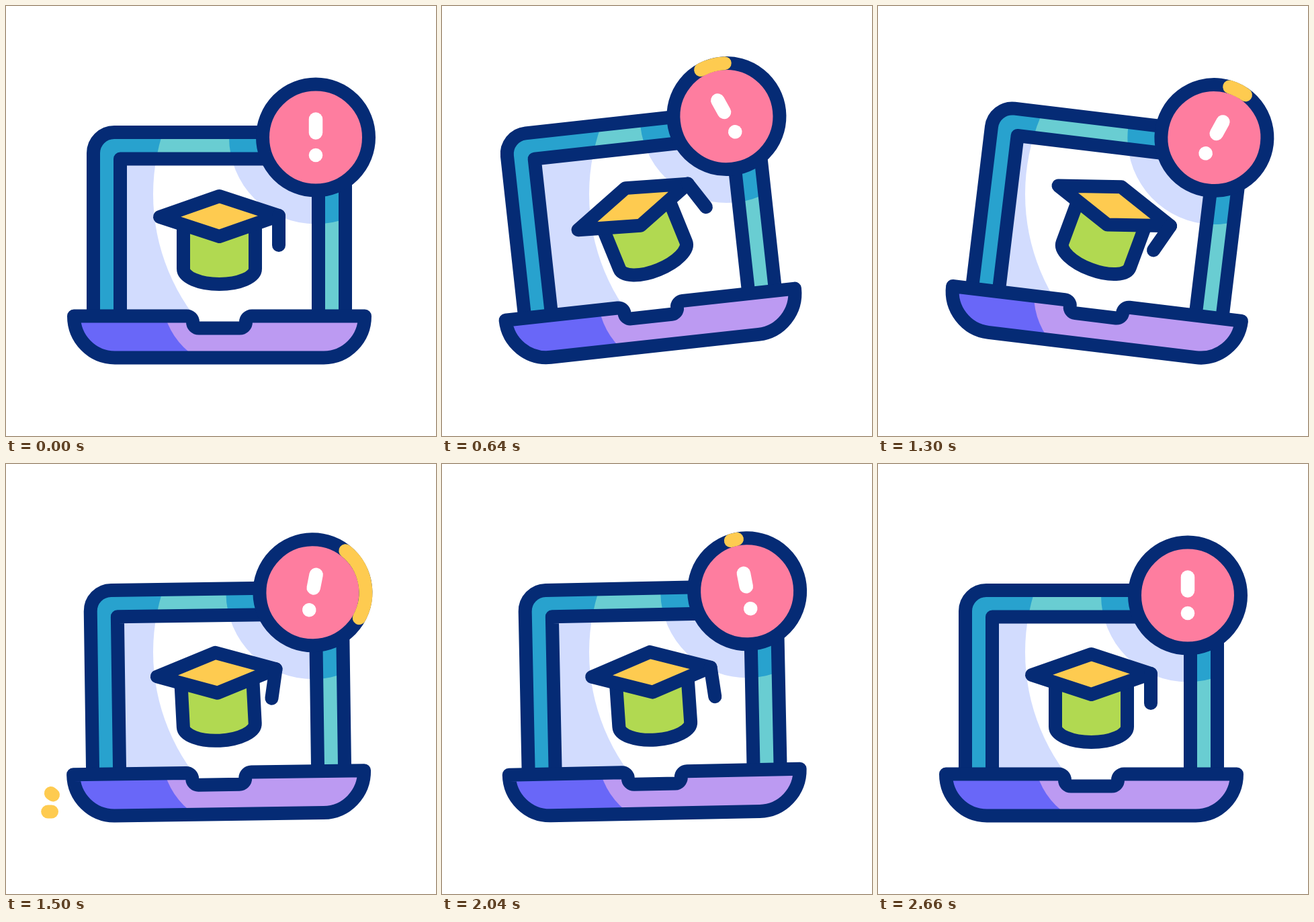
These frames come from a looping animation (640 px wide and 640 px high, 2820 ms). An HTML page with a canvas:

```html
<!DOCTYPE html>
<html lang="en">
<head>
<meta charset="utf-8">
<title>Rocking laptop</title>
<style>
  html, body { margin: 0; width: 100%; height: 100%; overflow: hidden; background: #fff; }
  canvas { display: block; width: 640px; height: 640px; }
</style>
</head>
<body>
<canvas id="stage"></canvas>
<script>
const LOOP = 2820;
const NAVY = '#052b75', TEAL = '#28a2ce', AQUA = '#69cdd2', HAZE = '#d2dcfe', WHITE = '#fff';
const INDIGO = '#6967f8', LILAC = '#bc9af2', PINK = '#fe7d9f', YELLOW = '#fecb50', GREEN = '#b1d951';

const canvas = document.getElementById('stage');
const ctx = canvas.getContext('2d');
const ratio = window.devicePixelRatio || 1;
canvas.width = canvas.height = 640 * ratio;

// Each swing: start, peak, end (ms), degrees at the peak
const SWINGS = {
  laptop: [[0, 340, 833, -8.1], [833, 1140, 1450, 8], [1450, 1818, 2080, -3.1], [2080, 2200, 2580, 2.05]],
  hat: [[0, 340, 833, -20.6], [833, 1140, 1450, 15.7], [1450, 1818, 2072, -8.5], [2072, 2200, 2600, 4.5]],
  mark: [[0, 450, 840, -25.8], [840, 1090, 1610, 23.5], [1610, 1930, 2204, -10.6], [2204, 2400, 2660, 5]],
  tassel: [[0, 600, 1010, -16], [1010, 1270, 1640, 14.5], [1640, 1860, 2120, -7.2], [2120, 2320, 2660, 4]]
};

const BADGE = { x: 461, y: 195.5, r: 79 };
const frame = new Path2D('M130 475V219A31 31 0 0 1 161 188H474A31 31 0 0 1 505 219V475');
const screen = new Path2D('M170 475V227.5H465V475');
const base = new Path2D('M101 461.5H269a9 9 0 0 1 9 9a9 9 0 0 0 9 9H348a9 9 0 0 0 9-9a9 9 0 0 1 9-9H534' +
  'A61 62 0 0 1 473 523.5H162A61 62 0 0 1 101 461.5Z');
const crown = new Path2D('M264 326V391A53.5 23 0 0 0 371 391V326');
const board = new Path2D('M229 314L317.5 283L406 312L317.5 343Z');
const cord = new Path2D('M406 312V356');
const bar = new Path2D('M0 -27V-7');
const shade = disc(BADGE.x, BADGE.y, 129);
// Light areas that stay put while the laptop rocks
const glow = disc(519, 280, 300);
const baseGlow = new Path2D('M342 320A110 110 0 0 0 342 540H700V320Z');

function disc(x, y, r) {
  const p = new Path2D();
  p.arc(x, y, r, 0, 2 * Math.PI);
  return p;
}

const smooth = u => { u = Math.min(1, Math.max(0, u)); return u * u * (3 - 2 * u); };

function angle(swings, t) {
  const s = swings.find(([from, , to]) => t >= from && t < to);
  if (!s) return 0;
  const [from, peak, to, amp] = s;
  if (t >= peak) return amp * (1 - ((t - peak) / (to - peak)) ** 3);
  const u = (t - from) / (peak - from);
  return amp * (from ? 1 - (1 - u) ** 2 : smooth(u));
}

function turn(x, y, deg) {
  ctx.translate(x, y);
  ctx.rotate(deg * Math.PI / 180);
  ctx.translate(-x, -y);
}

function group(draw) {
  ctx.save();
  draw();
  ctx.restore();
}

function fill(path, color) {
  ctx.fillStyle = color;
  ctx.fill(path);
}

function line(path, color = NAVY, width = 20) {
  ctx.strokeStyle = color;
  ctx.lineWidth = width;
  ctx.stroke(path);
}

function tilt(deg) {
  turn(deg < 0 ? 155 : 476, 523.5, deg);
}

// Fill in the base tone, then in the light tone inside a fixed area
function twoTone(path, deg, dark, light, area) {
  group(() => { tilt(deg); fill(path, dark); });
  group(() => { ctx.clip(area); tilt(deg); fill(path, light); });
}

function shaded(path, deg, color) {
  group(() => { tilt(deg); ctx.clip(shade); fill(path, color); });
}

function drawLaptop(deg) {
  twoTone(frame, deg, TEAL, AQUA, glow);
  shaded(frame, deg, TEAL);
  twoTone(screen, deg, HAZE, WHITE, glow);
  shaded(screen, deg, HAZE);
  group(() => { tilt(deg); line(frame); line(screen); });
  twoTone(base, deg, INDIGO, LILAC, baseGlow);
  group(() => { tilt(deg); line(base); });
}

function drawHat(t) {
  turn(317.5, 348, angle(SWINGS.hat, t));
  fill(crown, GREEN);
  line(crown);
  fill(board, YELLOW);
  line(board);
  turn(406, 312, angle(SWINGS.tassel, t));
  line(cord);
}

function drawBadge(t) {
  const ring = disc(0, 0, BADGE.r);
  ctx.translate(BADGE.x, BADGE.y);
  fill(ring, PINK);
  line(ring);
  ctx.rotate(angle(SWINGS.mark, t) * Math.PI / 180);
  line(bar, WHITE, 20.5);
  fill(disc(0, 26.5, 10.3), WHITE);
  for (const start of [520, 1240]) {
    const head = smooth((t - start) / 720), tail = smooth((t - start - 140) / 720);
    if (head <= tail) continue;
    const arc = new Path2D();
    arc.arc(0, 0, BADGE.r, (tail - 0.25) * 2 * Math.PI, (head - 0.25) * 2 * Math.PI);
    line(arc, YELLOW);
  }
}

function ray(t, start, x, y, dx, dy) {
  const head = smooth((t - start) / 333), tail = smooth((t - start - 162) / 333);
  if (head <= tail) return;
  const p = new Path2D();
  p.moveTo(x + dx * tail, y + dy * tail);
  p.lineTo(x + dx * head, y + dy * head);
  line(p, YELLOW);
}

function render(t) {
  ctx.setTransform(ratio, 0, 0, ratio, 0, 0);
  ctx.fillStyle = WHITE;
  ctx.fillRect(0, 0, 640, 640);
  ctx.lineCap = ctx.lineJoin = 'round';
  const deg = angle(SWINGS.laptop, t);
  drawLaptop(deg);
  group(() => { tilt(deg); drawHat(t); });
  group(() => { tilt(deg); drawBadge(t); });
  ray(t, 780, 567, 520, 41, 0);
  ray(t, 780, 566, 495.5, 21, -17);
  ray(t, 1420, 68, 517.5, -39, 0);
  ray(t, 1420, 70, 492.5, -21, -16.5);
}

const begin = performance.now();
function tick() {
  render((performance.now() - begin) % LOOP);
  requestAnimationFrame(tick);
}
tick();
</script>
</body>
</html>
```
